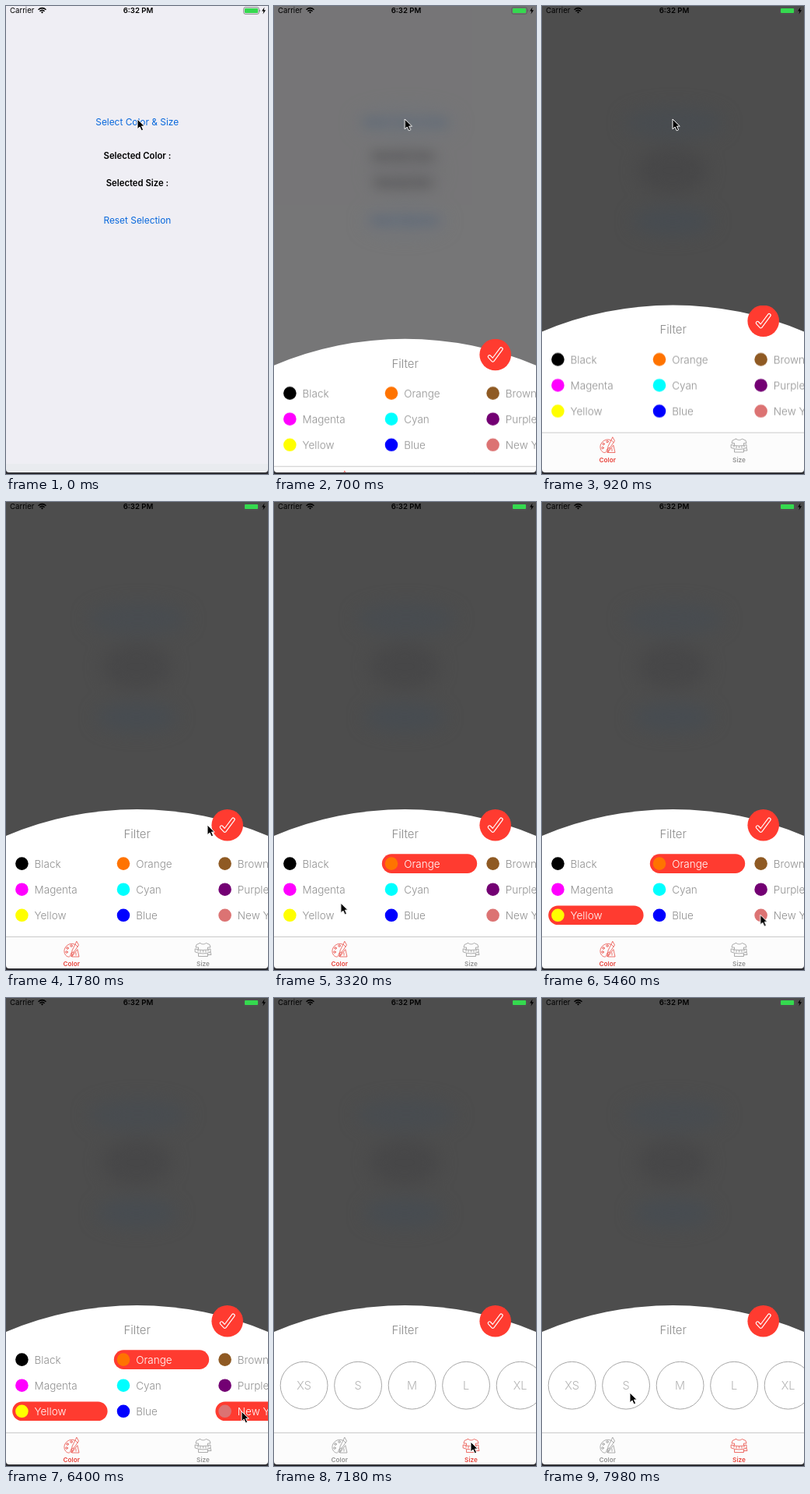
An HTML page that plays this animation: 337x600 px, repeating every 8 s.

```html
<!DOCTYPE html>
<html lang="en">
<head>
<meta charset="utf-8">
<title>Color and size filter</title>
<style>
  html, body { margin: 0; width: 100%; height: 100%; overflow: hidden; background: #efeef4; }
  svg { display: block; width: 100%; height: 100%; }
  text { font-family: Inter, Roboto, sans-serif; }
  .mid { text-anchor: middle; }
  .link { font-size: 11.9px; fill: #0868dc; }
  .label { font-size: 11.3px; font-weight: 600; }
  .title { font-size: 15px; font-weight: 300; fill: #8c8c8c; }
  .name { font-size: 13.5px; font-weight: 300; fill: #909090; }
  .size { font-size: 14.5px; font-weight: 300; fill: #b4b4b4; }
  .tab { font-size: 8.2px; font-weight: 600; fill: currentColor; }
  .status { font-size: 9.6px; }
  .icon { fill: none; stroke: currentColor; stroke-width: .75; stroke-linejoin: round; stroke-linecap: round; }
  #blobs { filter: blur(11px); }
</style>
</head>
<body>
<svg viewBox="0 0 337 600">
  <rect width="337" height="600" fill="#efeef4"/>
  <rect y="587" width="337" height="11" fill="#e9ebef"/>
  <g id="page" class="mid">
    <text class="link" x="168.7" y="152.8">Select Color &amp; Size</text>
    <text class="label" x="168.9" y="196.2">Selected Color :</text>
    <text class="label" x="168.9" y="230.6">Selected Size :</text>
    <text class="link" x="168.9" y="278.6">Reset Selection</text>
  </g>

  <g id="dim">
    <rect width="337" height="600" fill="#4d4d4d"/>
    <g id="blobs">
      <ellipse cx="170" cy="150" rx="64" ry="20" fill="#484c50"/>
      <ellipse cx="168" cy="211" rx="45" ry="29" fill="#474748"/>
      <ellipse cx="168" cy="276" rx="52" ry="18" fill="#474c51"/>
    </g>
  </g>

  <g id="sheet">
    <path d="M0 428A434.5 434.5 0 0 1 337 428V830H0Z" fill="#fff"/>
    <text class="title mid" x="168.7" y="430.8">Filter</text>
    <g id="colors"></g>
    <g id="sizes"></g>
    <path d="M0 558H337V830H0Z" fill="#fcfcfc"/>
    <path d="M0 557.5H337" stroke="#cacaca"/>
    <g id="colorTab">
      <g class="icon">
        <path d="M88 567C82 564 74 570 75 577C76 583 82 585 83 581C83 578 85 577 87 577"/>
        <circle cx="79" cy="572" r="1.3"/><circle cx="84" cy="569" r="1.3"/>
        <circle cx="78" cy="577" r="1.3"/>
        <path d="M91 563.5L93.500 568L88 576L84 583L85 575L89 567ZM89 567L92 570M92 574L94 583H85ZM90 578V581"/>
      </g>
      <text class="tab mid" x="84.2" y="595.3">Color</text>
    </g>
    <g id="sizeTab">
      <g class="icon">
        <path d="M249.5 565.5Q253.5 568.5 257.5 565.5L262 567.5L263 571H259.5V573M249.5 565.5L245 567.5L244 571H247.5V573M247.5 579V582.5H259.5V579"/>
        <path d="M243.500 573Q253.500 576 263 573V577Q253.500 581 243.500 577ZM247 574V576M250 575V577M253.500 575V577M257 575V577M260 574V576M263 577L264 580.5H259.5"/>
      </g>
      <text class="tab mid" x="253.5" y="595.3">Size</text>
    </g>
    <circle cx="284.7" cy="414.3" r="20.3" fill="#ff3b30"/>
    <g fill="none" stroke-linecap="round" stroke-linejoin="round">
      <path d="M277.2 416.8L281.4 421.4L292.2 407" stroke="#fff" stroke-width="5"/>
      <path d="M277.2 416.8L281.4 421.4L292.2 407" stroke="#ff3b30" stroke-width="2.7"/>
    </g>
  </g>

  <text class="status" x="5" y="9.4">Carrier</text>
  <g fill="none" stroke="#000" stroke-width="1.5">
    <path d="M41.5 4.7Q46.5 .5 51.5 4.7M43.4 6.7Q46.5 4 49.6 6.7"/>
    <path d="M45 8L46.5 6.9L48 8L46.5 9.6Z" fill="#000" stroke="none"/>
  </g>
  <text class="status mid" x="170" y="9.4" style="font-weight:600">6:32 PM</text>
  <rect x="305.8" y="1.7" width="19.5" height="8.6" rx="2" fill="none" stroke="#555" stroke-width=".7"/>
  <rect x="307" y="2.9" width="17.1" height="6.2" rx="1" fill="#35d94f"/>
  <path d="M326.4 4.5Q328 6 326.4 7.5Z" fill="#555"/>
  <path d="M332.5 1.5L329 6.6H331.3L330.5 10.5L334 5.2H331.7Z"/>

  <path d="M0 594Q0 598 4 598H333Q337 598 337 594V600H0Z" fill="#2c2c31"/>
  <path id="cursor" d="M0 0V12.8L3 10L5.2 14.8L7.6 13.7L5.5 9.1H9.3Z" stroke="#fff" stroke-width="1"/>
</svg>
<script>
const LOOP = 8000, RED = '#ff3b30', TAB_RED = '#e8433b', GRAY = '#929292';
const $ = id => document.getElementById(id);

function make(parent, tag, attrs, text) {
  const el = document.createElementNS('http://www.w3.org/2000/svg', tag);
  for (const key in attrs) el.setAttribute(key, attrs[key]);
  if (text) el.textContent = text;
  return parent.appendChild(el);
}

// Each step is [ms, properties, easing towards the next step].
function play(el, steps) {
  const last = steps[steps.length - 1];
  const frames = [...steps, [LOOP, last[1]]].map(([ms, props, easing = 'linear']) =>
    ({ ...props, offset: ms / LOOP, easing }));
  el.animate(frames, { duration: LOOP, iterations: Infinity }).startTime = 0;
}

const switchAt = (el, ms, prop, before, after) =>
  play(el, [[0, { [prop]: before }, 'steps(1, end)'], [ms, { [prop]: after }]]);

const swatches = [
  ['Black', '#000'], ['Magenta', '#f0f'], ['Yellow', '#ff0'],
  ['Orange', '#ff7300'], ['Cyan', '#0ff'], ['Blue', '#00f'],
  ['Brown', '#8f5a23'], ['Purple', '#730073'], ['New York Pink', '#dc7373']
];
const picks = { Orange: 2620, Yellow: 3780, 'New York Pink': 6120 };

swatches.forEach(([name, color], i) => {
  const x = 20.4 + Math.floor(i / 3) * 130.6, y = 463.6 + i % 3 * 33.1;
  const pickedAt = picks[name];
  if (pickedAt) {
    const pill = make($('colors'), 'rect',
      { x: x - 12.2, y: y - 12.3, width: 122.4, height: 24.6, rx: 12.3, fill: RED });
    switchAt(pill, pickedAt, 'opacity', 0, 1);
  }
  make($('colors'), 'circle', { cx: x, cy: y, r: 8.3, fill: color });
  const label = make($('colors'), 'text', { x: x + 16.2, y: y + 4.9, class: 'name' }, name);
  if (pickedAt) switchAt(label, pickedAt, 'fill', '#909090', '#fff');
});

['XS', 'S', 'M', 'L', 'XL'].forEach((name, i) => {
  const x = 38.6 + i * 69.5;
  make($('sizes'), 'circle', { cx: x, cy: 496.7, r: 30.4, fill: 'none', stroke: '#a6a6a6' });
  make($('sizes'), 'text', { x, y: 502, class: 'size mid' }, name);
});

const TAB = 7160;
switchAt($('colors'), TAB, 'opacity', 1, 0);
switchAt($('sizes'), TAB, 'opacity', 0, 1);
switchAt($('colorTab'), TAB, 'color', TAB_RED, GRAY);
switchAt($('sizeTab'), TAB, 'color', GRAY, TAB_RED);

// The sheet rises on a damped spring and settles after one overshoot.
const OPEN = 440, HEIGHT = 206, FREQ = Math.PI / .48, DECAY = 6.2;
const spring = s => HEIGHT * Math.exp(-DECAY * s) *
  (Math.cos(FREQ * s) + DECAY / FREQ * Math.sin(FREQ * s));
const shift = (x, y) => ({ transform: `translate(${x}px, ${y}px)` });

const rise = [[0, shift(0, HEIGHT)]];
for (let ms = 0; ms <= 1200; ms += 20) rise.push([OPEN + ms, shift(0, spring(ms / 1000))]);
rise.push([OPEN + 1220, shift(0, 0)]);
play($('sheet'), rise);

// The page blurs while the dark layer fades in.
const fade = (el, before, after) =>
  play(el, [[0, before], [OPEN, before, 'ease-in-out'], [OPEN + 400, after]]);
fade($('dim'), { opacity: 0 }, { opacity: 1 });
fade($('page'), { filter: 'blur(0px)' }, { filter: 'blur(10px)' });

const path = [
  [0, 169, 145], [920, 168, 145], [1180, 168, 145, 'ease-in-out'],
  [1780, 259, 414, 'ease-in-out'], [2350, 192, 461], [2900, 191, 461, 'ease-in'],
  [3320, 86, 514, 'ease-out'], [3620, 62, 527], [4000, 62, 527, 'ease-in'],
  [4460, 139, 529], [5100, 240, 530, 'ease-out'], [5720, 293, 529],
  [6000, 303, 529], [6400, 303, 530, 'ease-in-out'], [6900, 253, 569],
  [7340, 253, 569, 'ease-in-out'], [7900, 113, 506]
];
play($('cursor'), path.map(([ms, x, y, easing]) => [ms, shift(x, y), easing]));
</script>
</body>
</html>
```
